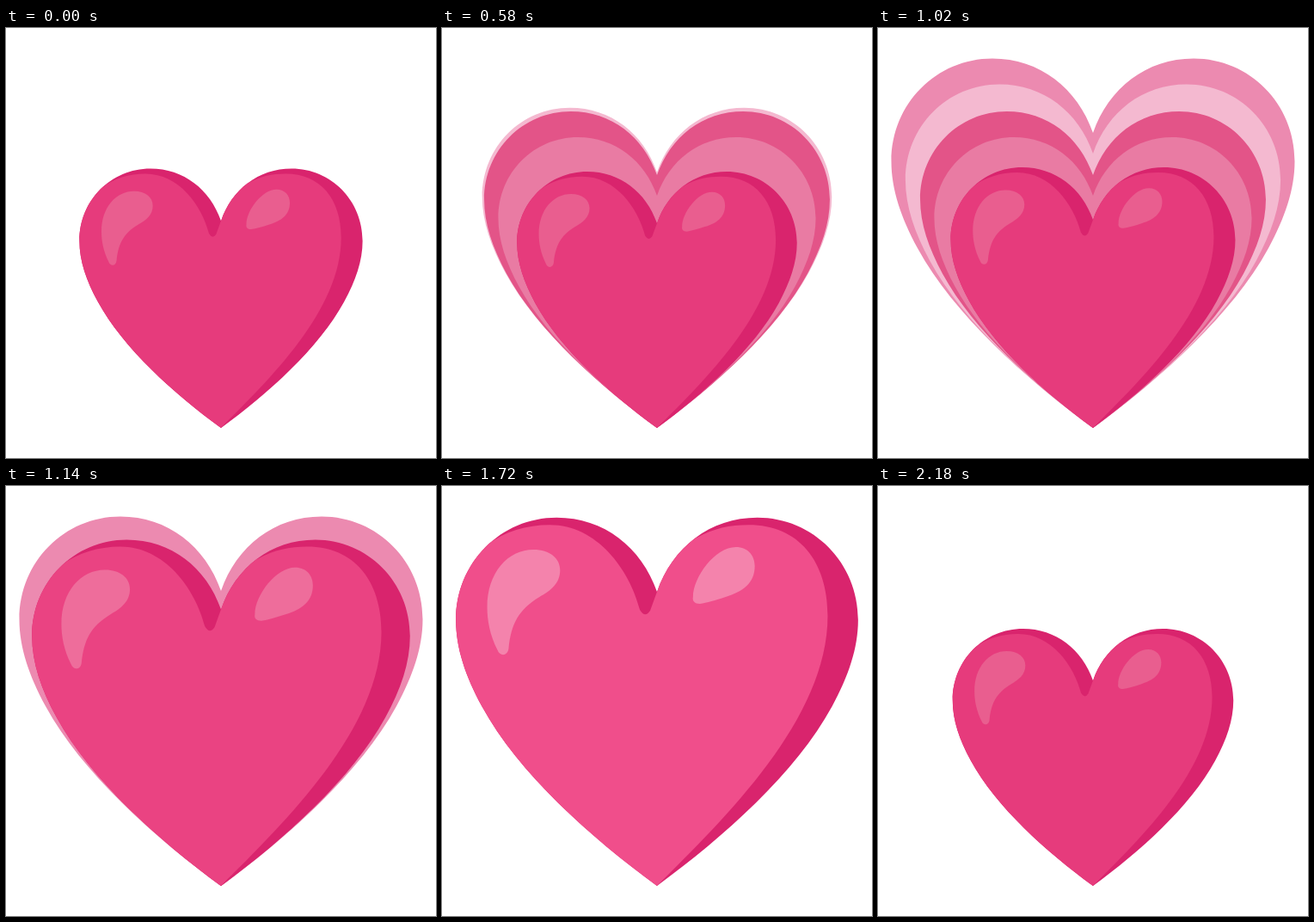
These frames come from a looping animation (500x500 px, 2.2 s). An HTML page:

```html
<!DOCTYPE html>
<html lang="en">
<head>
<meta charset="utf-8">
<title>Growing heart</title>
<style>
  html, body { margin: 0; width: 100%; height: 100%; overflow: hidden; background: #fff; }
  svg { display: block; width: 100vw; height: 100vh; }
</style>
</head>
<body>
<svg viewBox="0 0 500 500">
  <defs>
    <path id="heart" d="M250 122C232 70 188 35.5 133 35.5C68 35.5 15.5 88 15.5 155C15.5 188 27 221 46 256C88 333 172 408 250 465C328 408 412 333 454 256C473 221 484.5 188 484.5 155C484.5 88 432 35.5 367 35.5C312 35.5 268 70 250 122Z"/>
    <clipPath id="inside"><use href="#heart"/></clipPath>
  </defs>
  <g id="rings"></g>
  <g id="main">
    <use href="#heart" fill="#d9246d"/>
    <path id="face" clip-path="url(#inside)" d="M230 143C218 96 180 44 125 44C98 44 72 52 52 67L0 67V465H250C330 385 449 270 449 150C449 86 415 44 357 44C335 44 316 48 296 59L270 60L250 122L242 144Q236 153 230 143Z"/>
    <g id="shine">
      <path d="M64 190C55 172 52 155 52 140C52 100 76 73 106 73C125 73 137 83 137 97C137 112 126 121 113 128C88 143 80 160 77 188C76 197 67 198 64 190Z"/>
      <path d="M292 128C292 105 318 70 342 70C356 70 364 80 364 92C364 112 350 122 330 128C318 132 308 135 300 136C294 136 291 133 292 128Z"/>
    </g>
  </g>
</svg>
<script>
  const LOOP = 2200, SMALL = 0.694, RINGS_END = 1300;
  const $ = id => document.getElementById(id);

  // Back to front: colour, start and end time, start and end scale
  const rings = [
    ['#ec8ab0', 710, 975, 0.93, 1],
    ['#f4b9d0', 535, 735, 0.857, 0.93],
    ['#e35488', 265, 530, 0.7, 0.857],
    ['#e97ba3', 0, 265, SMALL, 0.787]
  ].map(([fill, start, end, from, to]) => {
    const el = document.createElementNS('http://www.w3.org/2000/svg', 'use');
    el.setAttribute('href', '#heart');
    el.setAttribute('fill', fill);
    $('rings').append(el);
    return { el, start, end, from, to };
  });

  const progress = (t, a, b) => Math.min(1, Math.max(0, (t - a) / (b - a)));
  const smooth = p => p * p * (3 - 2 * p);
  const cubic = p => p < 0.5 ? 4 * p ** 3 : 1 - 4 * (1 - p) ** 3;
  const mix = (a, b, p) => a + (b - a) * p;
  const blend = (a, b, p) => `rgb(${a.map((v, i) => Math.round(mix(v, b[i], p)))})`;

  // Scale about the heart's tip
  const grow = (el, s) =>
    el.setAttribute('transform', `translate(250 465) scale(${s}) translate(-250 -465)`);

  function mainScale(t) {
    if (t < 960) return mix(0.702, SMALL, smooth(progress(t, 0, 100)));
    if (t < 1640) return mix(SMALL, 1, cubic(progress(t, 960, 1248)));
    return mix(1, SMALL, cubic(progress(t, 1640, 2255)));
  }

  function draw(t) {
    for (const r of rings) {
      const shown = t >= r.start && t < RINGS_END;
      r.el.setAttribute('visibility', shown ? 'visible' : 'hidden');
      grow(r.el, mix(r.from, r.to, smooth(progress(t, r.start, r.end))));
    }
    grow($('main'), mainScale(t));
    const light = smooth(progress(t, 1000, 1320)) - smooth(progress(t, 1840, 2180));
    $('face').setAttribute('fill', blend([230, 59, 124], [240, 78, 139], light));
    $('shine').setAttribute('fill', blend([233, 94, 143], [244, 131, 172], light));
  }

  const begin = performance.now();
  function tick() {
    draw((performance.now() - begin) % LOOP);
    requestAnimationFrame(tick);
  }
  tick();
</script>
</body>
</html>
```
